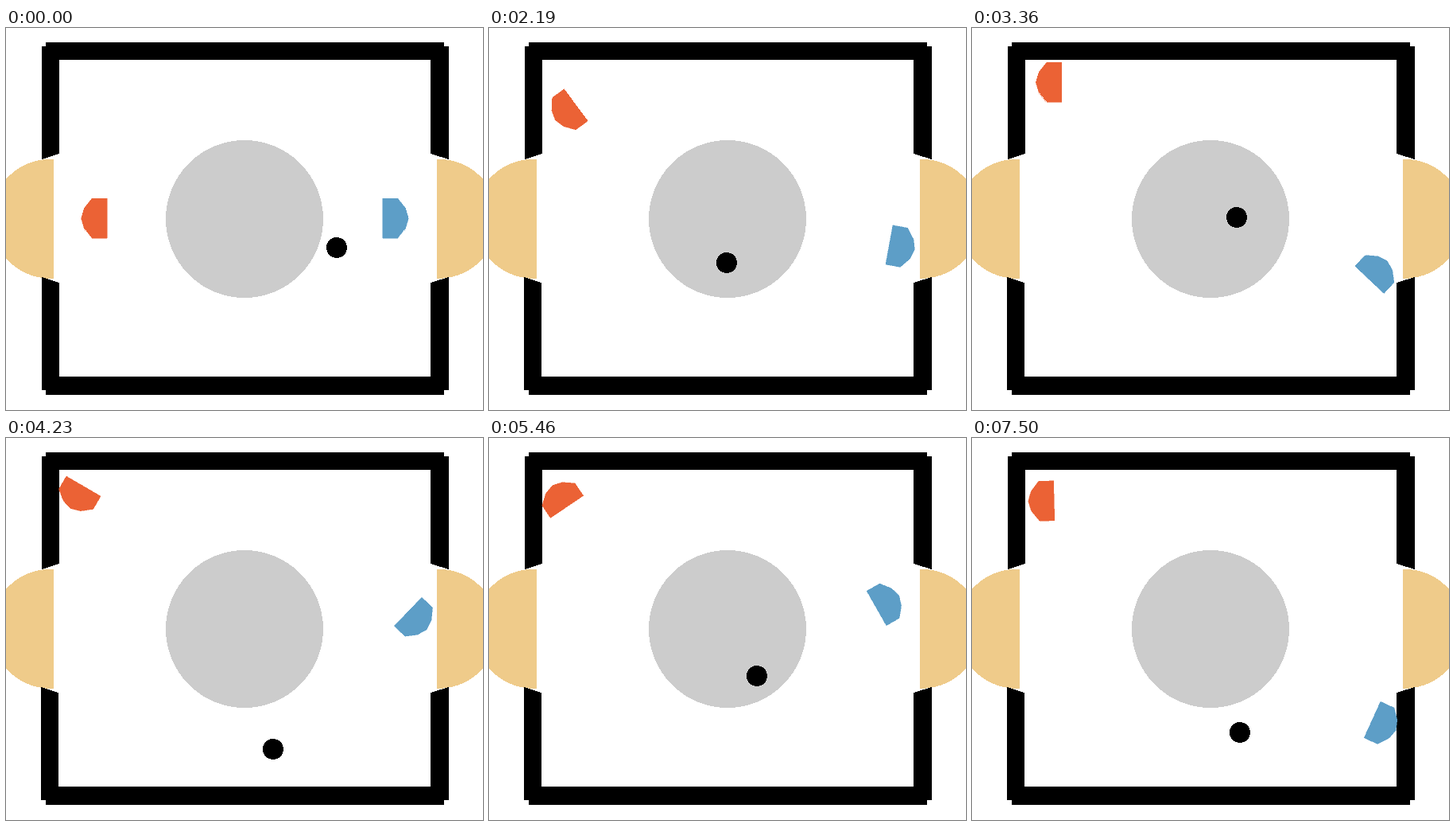
An HTML page for the animation above (7530 ms loop, 600 px wide and 480 px high).

```html
<!DOCTYPE html>
<html lang="en">
<head>
<meta charset="utf-8">
<title>Air hockey</title>
<style>
  html, body { margin: 0; width: 100%; height: 100%; overflow: hidden; background: #fff; }
  svg { display: block; }
</style>
</head>
<body>
<svg width="600" height="480" viewBox="0 0 600 480" shape-rendering="crispEdges">
  <circle cx="300" cy="240" r="99" fill="#ccc"/>
  <g fill="#efcb8a">
    <path d="M60 165H50A75 75 0 0 0 50 314.5H60Z"/>
    <path d="M542 165H550A75 75 0 0 1 550 314.5H542Z"/>
  </g>
  <path d="M50 18H550L551 19V23H556L557 24V40H45V23H50Z"/>
  <path d="M50 461H551V455H556V438H50Z"/>
  <path d="M45 40H67V158L45 165Z"/>
  <path d="M557 40H534V158L557 165Z"/>
  <path d="M557 313L534 320V455H557Z"/>
  <path id="post" d="M45 313L67 320V455H45Z"/>
  <polygon id="red" fill="#eb6235" stroke="#eb6235" stroke-width=".5"/>
  <polygon id="blue" fill="#5d9ec7" stroke="#5d9ec7" stroke-width=".5"/>
  <circle id="puck" r="13"/>
</svg>
<script>
const STEP = 30, STEPS = 251, POST_HIT = 40;
const TOP = 53, BOTTOM = 425;
const get = id => document.getElementById(id);
const red = get('red'), blue = get('blue'), puck = get('puck'), post = get('post');

// Half of the bat outline, mirrored below its axis and for the other side.
const half = [[5, 20], [-10, 20], [-18, 10], [-21, 0]];
const bat = [...half, ...half.map(([x, y]) => [x, -y]).reverse()];
const outline = side => bat.map(([x, y]) => [x * 1.25 * side, y * 1.25].join()).join(' ');
red.setAttribute('points', outline(1));
blue.setAttribute('points', outline(-1));

// Key poses: step, then x, y, angle of red and of blue.
const poses = [
  [0, 120.8, 239, 0, 480.2, 239, 0],
  [16, 98, 250, 7, 433.5, 262.5, 10],
  [39, 82.1, 244.5, 18.8, 509.2, 243.5, -4.6],
  [73, 104.5, 100.3, -36.6, 509.6, 273.6, 10.4],
  [112, 106.5, 68, 0, 504.2, 311.8, -46.6],
  [141, 94.4, 66, -59.8, 510.2, 222.5, 44],
  [182, 94.5, 81.3, 56, 492.9, 210.9, -29.6],
  [250, 97, 79, -1.5, 509.2, 356.6, 24.5]
];

// Serve, bank shot and rebound off the goal post, then a fading bounce:
// each leg takes longer and the sideways drift shrinks to a third.
function puckPath() {
  const path = [[0, 416, 276], [16.8, 416, 276], [26.5, 245, TOP], [39, 69, 307], [41.5, 69, 307]];
  let y = TOP, leg = 15.63, gap = 147;
  for (let n = 51.49; n < STEPS + leg; n += leg, leg *= 1.0785) {
    path.push([n, 337 - gap, y]);
    y = TOP + BOTTOM - y;
    gap /= 3;
  }
  return path;
}
const track = puckPath();

function at(path, n) {
  let i = 1;
  while (i < path.length - 1 && path[i][0] < n) i++;
  const a = path[i - 1], b = path[i];
  const k = (n - a[0]) / (b[0] - a[0]);
  return { k, v: a.slice(1).map((p, j) => p + (b[j + 1] - p) * k) };
}

function place(el, x, y, angle) {
  el.setAttribute('transform', `translate(${x} ${y}) rotate(${angle})`);
}

function draw(n) {
  const { k, v: [rx, ry, ra, bx, by, ba] } = at(poses, n);
  const sway = Math.sin(Math.PI * k);
  place(red, rx, Math.max(65, ry - 10 * sway), ra);
  place(blue, Math.min(511, bx + 6 * sway), by, ba);
  const [x, y] = at(track, n).v.map(Math.round);
  puck.setAttribute('cx', x);
  puck.setAttribute('cy', y);
  post.setAttribute('transform', `translate(${n < POST_HIT ? 0 : -1} 0)`);
}

const start = performance.now();
function tick() {
  const t = Math.max(0, performance.now() - start);
  draw(Math.floor(t / STEP) % STEPS);
  requestAnimationFrame(tick);
}
draw(0);
requestAnimationFrame(tick);
</script>
</body>
</html>
```
